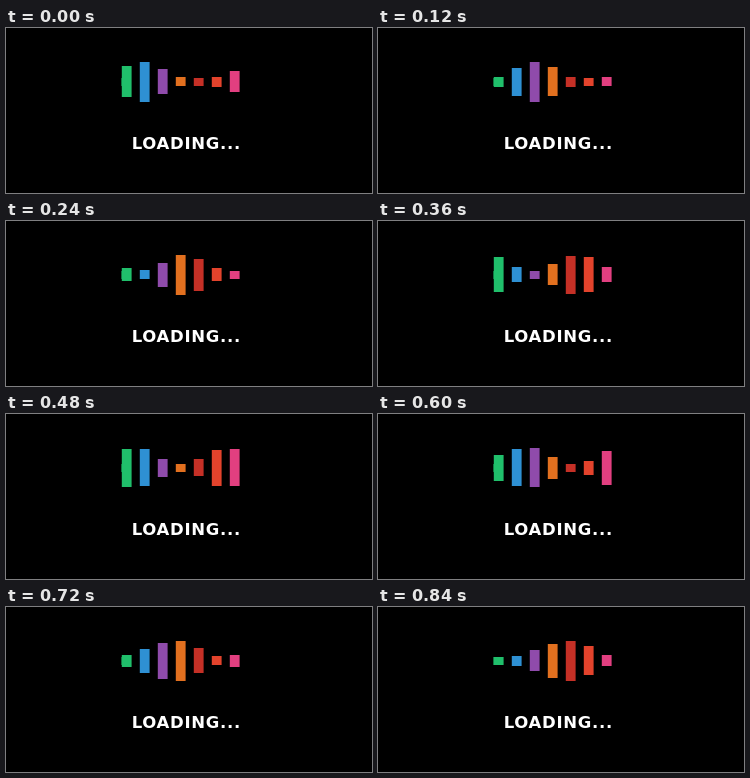
Recreate the animation shown at these times as an HTML page. Size 366 by 165 pixels, loop 0.96 s.

```html
<!DOCTYPE html>
<html lang="en">
<head>
<meta charset="utf-8">
<title>Loading</title>
<style>
  html, body { margin: 0; width: 100%; height: 100%; overflow: hidden; background: #000; }
  svg { display: block; width: 100vw; height: 100vh; }
  text { font: bold 16.5px "DejaVu Sans", sans-serif; letter-spacing: .7px; fill: #fff; }
</style>
</head>
<body>
<svg viewBox="0 0 366 165">
  <rect width="366" height="165"/>
  <rect x="115.3" y="50" width="1" height="8" fill="#17914f"/>
  <g id="bars"></g>
  <text x="125.7" y="121">LOADING...</text>
</svg>
<script>
  const STEP = 120, STEPS = 8;
  const MID = 54, LEFT = 115.8, PITCH = 18, WIDTH = 9.8;
  const LOW = 8, HIGH = 40;
  const SPEED = 1.17; // bars travelled per step
  const FRONT = 2.4;  // reach ahead of a crest, in bars
  const colors = ['#20bf6b', '#2e90d3', '#8f4bab', '#e2701f', '#c53026', '#e3432c', '#e23f80'];

  // Crests of the wave: place at the loop start and reach behind, in bars
  const crests = [
    { at: 8.05, tail: 3.7 },
    { at: 0.85, tail: 2.4 },
    { at: -4.15, tail: 3.7 }
  ];

  const group = document.getElementById('bars');
  const bars = colors.map((fill, i) => {
    const bar = document.createElementNS('http://www.w3.org/2000/svg', 'rect');
    bar.setAttribute('x', LEFT + i * PITCH);
    bar.setAttribute('width', WIDTH);
    bar.setAttribute('fill', fill);
    return group.appendChild(bar);
  });

  // Raised cosine around a crest, from 0 to 1
  function swell(distance, tail) {
    const reach = distance < 0 ? tail : FRONT;
    const part = Math.min(1, Math.abs(distance) / reach);
    return (1 + Math.cos(Math.PI * part)) / 2;
  }

  function draw(time) {
    const moved = Math.floor(time / STEP) % STEPS * SPEED;
    bars.forEach((bar, i) => {
      const level = Math.max(...crests.map(c => swell(i - c.at - moved, c.tail)));
      const height = Math.round(LOW + (HIGH - LOW) * level);
      bar.setAttribute('y', MID - Math.ceil(height / 2));
      bar.setAttribute('height', height);
    });
  }

  const start = performance.now();
  function tick() {
    draw(performance.now() - start);
    requestAnimationFrame(tick);
  }
  tick();
</script>
</body>
</html>
```
